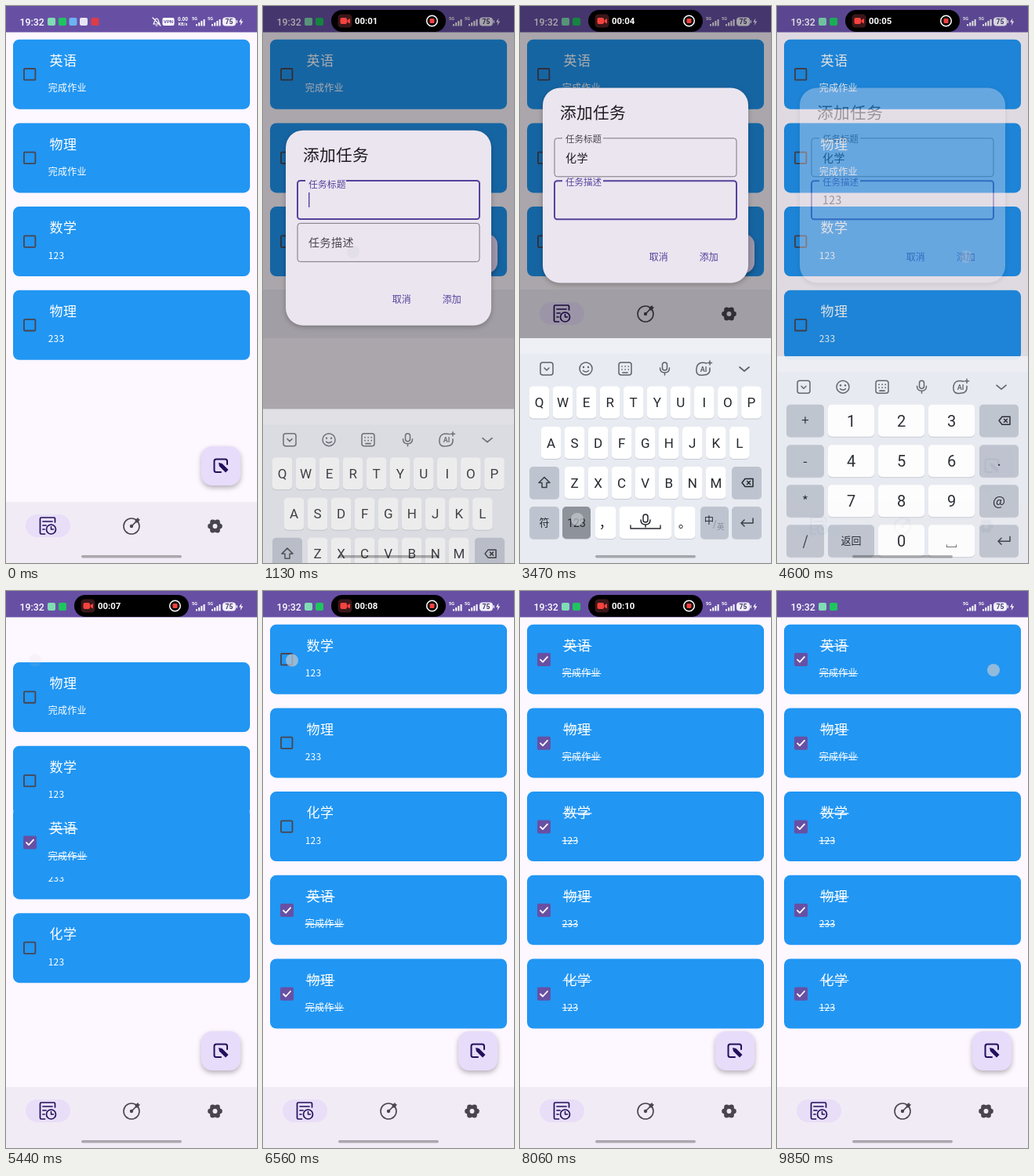
Animation of 320x711 px, one loop 9.95 s. Source, as an HTML page:

```html
<!DOCTYPE html>
<html lang="zh">
<head>
<meta charset="utf-8">
<title>Tasks</title>
<style>
html, body { margin: 0; width: 100%; height: 100%; overflow: hidden; background: #fdf7ff; }
svg { display: block; width: 100vw; height: 100vh; }
text { font-family: "Noto Sans CJK SC", "Noto Sans CJK", "Noto Sans", sans-serif; white-space: pre; }
.ui { font-family: Roboto, "Noto Sans CJK SC", sans-serif; }
#fab { filter: drop-shadow(0 3px 3px rgba(0, 0, 0, .28)); }
</style>
</head>
<body>
<svg id="stage" viewBox="0 0 320 711" xmlns="http://www.w3.org/2000/svg"></svg>
<script>
const LOOP = 9950, STEP = 93.81, TICK = 1.25;
const PURPLE = '#6750a4', ACCENT = '#54429b', INK = '#49454f', DEEP = '#21105a';

// Markup helpers; text is placed by its vertical centre.
const rect = (x, y, w, h, r, fill, more = '') =>
  `<rect x="${x}" y="${y}" width="${w}" height="${h}" rx="${r}" fill="${fill}" ${more}/>`;
const text = (x, y, size, str, fill, more = '') =>
  `<text x="${x}" y="${y + size * .37}" font-size="${size}" fill="${fill}" ${more}>${str}</text>`;
const line = (d, color, w = 1.5, more = '') =>
  `<path d="${d}" fill="none" stroke="${color}" stroke-width="${w}" stroke-linecap="round" stroke-linejoin="round" ${more}/>`;
const ring = (x, y, r, color, w = 1.5) =>
  `<circle cx="${x}" cy="${y}" r="${r}" fill="none" stroke="${color}" stroke-width="${w}"/>`;
const dot = (x, y, r, fill) => `<circle cx="${x}" cy="${y}" r="${r}" fill="${fill}"/>`;
const group = (id, body, more = '') => `<g id="${id}" ${more}>${body}</g>`;
const MID = 'text-anchor="middle"', UI = 'class="ui"';

// Tasks: each check sends the top card to the end of the list.
const tasks = [['英语', '完成作业'], ['物理', '完成作业'], ['数学', '123'], ['物理', '233'], ['化学', '123']];
const moves = [5335, 5990, 6640, 7109, 7720];
const MOVE = 200, PITCH = 106.7, TOP = 42.7;

const card = ([title, note], i) => group('card' + i,
  rect(9, 0, 302, 89, 8, '#2196f3') +
  rect(23, 37.3, 14.4, 14.4, 1, 'none', `stroke="${INK}" stroke-width="1.8" class="off"`) +
  text(55.5, 27, 17, title, '#fff', 'letter-spacing=".5"') +
  text(53.7, 62, 12, note, '#fff', 'letter-spacing=".25"') +
  `<g class="on">${rect(22, 36.3, 17, 17, 2, PURPLE)}${line('M26 45l3 3 6-6.5', '#fff', 1.8)}` +
  line(`M55 27.8h36M54 62.8h${note.length > 3 ? 49 : 19.5}`, '#fff', 1.1) + '</g>');

// Status bar
const signal = x => text(x - 8, 15.5, 5.5, '5G', '#fff', UI + ' font-weight="700"') +
  [0, 1, 2, 3].map(i => rect(x - 3 + i * 3.2, 23 - i * 2, 2, 2.5 + i * 2, .6, '#fff')).join('');
const badge = (x, c) => rect(x - 5, 15, 10, 10, 2, c);
const status = rect(0, 0, 320, 33.5, 0, PURPLE) +
  text(17.5, 20, 12.3, '19:32', '#fff', UI + ' font-weight="500"') +
  badge(58, '#7fdcb4') + badge(72, '#1fc45f') +
  group('extras',
    badge(85.5, '#6db2f2') + badge(99, '#e9e4f6') + badge(113.5, '#dd3c48') +
    line('M188 23h8c-2-2-1-7-4-7s-2 5-4 7M191 25h2M187 15l10 10', '#fff', 1.2) +
    rect(199.5, 15, 15, 10, 2, '#fff') +
    text(207, 20.2, 6, 'VPN', PURPLE, `${UI} ${MID} font-weight="700"`) +
    text(225.5, 17, 6.5, '0.00', '#fff', `${UI} ${MID} font-weight="700"`) +
    text(225.5, 23.2, 5.5, 'KB/s', '#fff', `${UI} ${MID} font-weight="700"`)) +
  signal(245) + signal(265) +
  rect(276, 14.5, 17, 11, 4, '#f4f0fb') + rect(293.5, 18, 1.5, 4, .7, '#f4f0fb') +
  text(284.5, 20.2, 8.5, '75', '#41376a', `${UI} ${MID} font-weight="700"`) +
  '<path d="M300.5 15.5l-3.5 5h2.5l-.8 4.500 3.500-5.500h-2.500z" fill="#fff"/>';

const island = group('island',
  rect(87, 5, 146, 28, 14, '#000') + rect(95.5, 10.5, 18, 17, 4.5, '#3b1719') +
  rect(98.500, 15, 8.500, 8, 2, '#f4433f') + '<path d="M107.500 18l3.500-2v6.500l-3.500-2z" fill="#f4433f"/>' +
  `<text id="clock" class="ui" x="117" y="23.200" font-size="11.400" font-weight="700" fill="#fff"></text>` +
  ring(215.5, 19, 6.8, '#fff', 1.5) + rect(212.500, 16, 6, 6, 1.200, '#f4433f'));

// Bottom navigation and floating button
const petals = [0, 1, 2, 3, 4, 5].map(i => {
  const a = i * Math.PI / 3;
  return dot(266.5 + 6 * Math.cos(a), 664 + 6 * Math.sin(a), 3.3, INK);
}).join('');
const nav = group('nav',
  rect(0, 633, 320, 360, 0, '#fdf7ff') + rect(0, 633, 320, 78, 0, '#f1ebf5', 'id="navBar"') +
  group('navIcons',
    rect(25, 649, 57, 29, 14.5, '#e8def8') +
    line('M62.500 659v-4.500q0-1.500-1.500-1.500h-16q-1.500 0-1.500 1.500v18q0 1.500 1.500 1.500h4.500M47 658h12M47 663h4M47 668h2', DEEP, 1.7) +
    ring(57.5, 668, 6, DEEP, 1.7) + line('M57.500 664.500v3.500h3', DEEP, 1.5) +
    ring(160, 664, 10, INK, 1.6) + dot(160, 664, 2.2, INK) +
    line('M160 664l7-7', INK, 1.6) + `<path d="M164.500 656l4-3 .5 2 2 .5-3 4h-3z" fill="${INK}"/>` +
    petals + ring(266.5, 664, 5.2, INK, 4.6) + dot(266.5, 664, 2.9, '#f1ebf5')));
const fab = group('fab',
  rect(249, 562, 50, 50, 14, '#e8dcfb') +
  line('M282 585v-4q0-2.500-2.500-2.500h-11.500q-2.500 0-2.500 2.500v11.500q0 2.500 2.500 2.500h6', DEEP, 2) +
  `<path d="M271 583l4.500 1 8 8-3.500 3.500-8-8z" fill="${DEEP}"/>`);

// Dialog
const field = (id, y, name) =>
  rect(44, y, 232, 49, 3.5, 'none', `id="${id}Box"`) +
  rect(54, y - 3, 52, 6, 0, '#ebe5f0', `id="${id}Gap"`) +
  `<text id="${id}Label" x="58">${name}</text>` +
  `<text id="${id}Value" x="58" y="${y + 30.2}" font-size="14" letter-spacing=".5" fill="#1d1b20"></text>` +
  rect(58, y + 15, 1.4, 19, 0, ACCENT, `id="${id}Caret"`);
const dialog = group('dialog',
  rect(29, 0, 262, 249, 22, '#ebe5f0', 'style="filter:drop-shadow(0 2px 3px rgba(0,0,0,.25))"') +
  text(51, 31.5, 20.7, '添加任务', '#1d1b20', 'letter-spacing=".3"') +
  field('title', 64.3, '任务标题') + field('note', 118.7, '任务描述') +
  text(164.7, 216, 12, '取消', ACCENT, 'font-weight="500"') +
  text(228.7, 216, 12, '添加', ACCENT, 'font-weight="500"'));

// Keyboard
const keyAt = {};
const GREY = '#bec4cf', rowY = [485.5, 537, 588, 639];
const key = (name, x, row, w, fill = '#fff', size = 17) => {
  const y = rowY[row];
  keyAt[name] = [x + w / 2, y + 20];
  return rect(x, y + 1, w, 41, 5, '#c6cad3') + rect(x, y, w, 41, 5, fill, `data-key="${name}"`) +
    (size ? text(x + w / 2, y + 20.5, size, name, '#24272d', `${/\w/.test(name) ? UI : ''} ${MID}`) : '');
};
const letters = (str, x, row) => [...str].map((c, i) => key(c, x + i * 30.05, row, 25.6)).join('');
const erase = y => line(`M283 ${y}l4-5h10v10h-10zM289.500 ${y - 2}l4 4m0-4l-4 4`, '#24272d', 1.5);
const enter = line('M297 654v6h-15m4-4l-4 4 4 4', '#3a3e46', 1.5);
const mic = (x, y, c) => rect(x - 3, y - 8, 6, 10, 3, 'none', `stroke="${c}" stroke-width="1.500"`) +
  line(`M${x - 6} ${y - 1}q0 6 6 6t6-6M${x} ${y + 5}v3`, c);
const TOOL = '#5d626b';
const tools = group('tools',
  rect(26, 455, 16, 16, 3, 'none', `stroke="${TOOL}" stroke-width="1.500"`) + line('M31 462l3 3 3-3', TOOL) +
  ring(84, 463, 8, TOOL) + dot(81, 461, 1.2, TOOL) + dot(87, 461, 1.2, TOOL) + line('M80.500 465.500q3.500 3 7 0', TOOL) +
  rect(126, 455, 16, 16, 3, 'none', `stroke="${TOOL}" stroke-width="1.500"`) +
  line('M130 460h.1m4 0h.1m4 0h.1M130 464h.1m4 0h.1m4 0h.1M131 468h6', TOOL, 1.7) +
  mic(184.5, 463, TOOL) +
  line('M238 456q-12-3-13 7t9 8q9 0 8-9M242 453v5m-2.500-2.500h5', TOOL) +
  text(234, 463.5, 9, 'AI', TOOL, `${UI} ${MID} font-weight="700"`) +
  line('M280 461l6 5 6-5', TOOL, 1.7));
const alpha = group('alpha',
  letters('QWERTYUIOP', 11.7, 0) + letters('ASDFGHJKL', 26.7, 1) + letters('ZXCVBNM', 56.7, 2) +
  key('shift', 12, 2, 38, GREY, 0) + line('M31 601.500l-7 7h4v6h6v-6h4z', '#3a3e46') +
  key('del', 270, 2, 38, GREY, 0) + erase(608.5) +
  key('符', 12, 3, 38, GREY, 13) + key('123', 54, 3, 36, GREY, 14) +
  key('，', 96, 3, 26.5) + key('space', 126.5, 3, 67, '#fff', 0) + mic(160, 657, '#24272d') +
  line('M141 663v4h38v-4', '#24272d', 1.4) + key('。', 197, 3, 26.5) +
  key('lang', 230, 3, 36, GREY, 0) + text(235, 657, 12, '中', '#24272d') +
  text(246, 661, 11, '/', '#858b96') + text(251, 664, 9.5, '英', '#858b96') +
  key('enter', 270, 3, 38, GREY, 0) + enter);
const digits = group('digits',
  [...'+-*/'].map((c, i) => key(c, 12, i, 48, GREY)).join('') +
  [...'123456789'].map((c, i) => key(c, 65 + i % 3 * 64, i / 3 | 0, 59, '#fff', 20)).join('') +
  key('返回', 65, 3, 59, GREY, 13) + key('0', 129, 3, 59, '#fff', 20) + key('␣', 193, 3, 59) +
  key('bksp', 258, 0, 50, GREY, 0) + erase(506) +
  key('.', 258, 1, 50, GREY) + key('@', 258, 2, 50, GREY) + key('ret', 258, 3, 50, GREY, 0) + enter);
// The digit pad has its own "123" neighbours, so the mode key keeps its place.
const keyboard = group('keyboard',
  rect(0, 424, 320, 290, 0, '#e8ebf1') + rect(0, 424, 320, 20, 0, '#eef0f5') + tools +
  group('strip', `<text id="pinyin" class="ui" x="14" y="438" font-size="11" fill="${TOOL}"></text>` +
    `<text id="words" x="16" y="469" font-size="16" fill="#24272d"></text>`) + alpha + digits);

document.getElementById('stage').innerHTML =
  rect(0, 0, 320, 711, 0, '#fdf7ff') + group('list', tasks.map(card).join('')) +
  nav + fab + status + rect(0, 0, 320, 711, 0, '#000', 'id="scrim"') +
  dialog + keyboard + rect(96, 701, 128, 3.6, 1.8, '#000', 'id="handle" opacity=".29"') +
  island + '<g id="touches"></g>';

const $ = id => document.getElementById(id);
const set = (id, attrs) => { for (const k in attrs) $(id).setAttribute(k, attrs[k]); };
const show = (node, on) => { node.style.display = on ? '' : 'none'; };
const prog = (t, start, dur) => Math.min(1, Math.max(0, (t - start) / dur));
const out = p => 1 - (1 - p) * (1 - p);
const inOut = p => .5 - Math.cos(p * Math.PI) / 2;

// Touches: down, up, x, y, key
const press = (t, k) => [t, t + 90, ...keyAt[k], k];
const TYPE = 1450, GAP = 180, PICK = 2680;
const touches = [
  [420, 500, 274, 588], [900, 1010, 115, 314],
  ...[...'HUAXUE'].map((c, i) => press(TYPE + i * GAP, c)),
  [2600, PICK, 31, 463], [2900, 2990, 110, 247], [3420, 3520, 73, 655, '123'],
  ...[...'123'].map((c, i) => press(3740 + i * 190, c)),
  [4410, 4500, 241, 320],
  ...moves.map(m => [m - 130, m - 40, 37, 88.5]),
  [9700, LOOP + 90, 276, 101]
];
$('touches').innerHTML = touches.map(([, , x, y]) => dot(x, y, 8, '#c9ccd2')).join('');
const marks = [...$('touches').children];
const caps = [...document.querySelectorAll('[data-key]')].map(n => [n, n.dataset.key, n.getAttribute('fill')]);

function drawList(t) {
  tasks.forEach((_, i) => {
    const node = $('card' + i);
    let slot = i;
    moves.forEach((m, k) => {
      const p = inOut(prog(t, m, MOVE));
      slot += i === k ? 4 * p : -p;
    });
    node.setAttribute('transform', `translate(0 ${TOP + slot * PITCH})`);
    const done = t >= moves[i] - 40;
    show(node.querySelector('.on'), done);
    show(node.querySelector('.off'), !done);
    show(node, i < 4 || t > 4600);
    node.setAttribute('opacity', i < 4 ? 1 : prog(t, 4600, 150));
  });
  // The travelling card stays above the others.
  const k = moves.findIndex(m => t < m + MOVE);
  if (k >= 0) $('list').append($('card' + k));
}

function drawField(id, y, t, from, until, value) {
  const p = out(prog(t, from, 200)), focus = t >= from && t < until;
  const size = 14 - 2.5 * p, mid = y + 24.5 - 23.3 * p;
  set(id + 'Box', { stroke: focus ? ACCENT : '#7a757f', 'stroke-width': focus ? 2 : 1 });
  show($(id + 'Gap'), p > .5);
  set(id + 'Label', { y: mid + size * .37, 'font-size': size, 'letter-spacing': .5 - .5 * p, fill: focus ? ACCENT : INK });
  $(id + 'Value').textContent = value;
  set(id + 'Caret', { x: 58 + value.length * (id === 'title' ? 14.5 : 8.3) });
  show($(id + 'Caret'), focus && (t - from) % 800 < 400);
}

function draw(t) {
  drawList(t);
  show($('extras'), t < 90);

  const pop = Math.min(out(prog(t, 60, 200)), 1 - prog(t, 9550, 160));
  set('island', { transform: `translate(160 19) scale(${pop}) translate(-160 -19)` });
  $('clock').textContent = '00:' + String(Math.floor(t * TICK / 1000 + .25)).padStart(2, '0');

  const raised = t >= 1050 && t < 4580;
  const lift = `translate(0 ${raised ? -271 : 0})`;
  set('nav', { transform: lift });
  set('fab', { transform: lift });
  set('navBar', { height: raised ? 62 : 78 });
  show($('navIcons'), !raised || t > 1250);

  const open = Math.min(prog(t, 520, 130), 1 - prog(t, 4520, 120));
  set('scrim', { opacity: .33 * open });
  set('dialog', { opacity: open, transform: `translate(0 ${104.500 + 134.500 * (1 - out(prog(t, 1000, 344)))})` });
  drawField('title', 64.3, t, 1000, 3000, t >= PICK ? '化学' : '');
  const typed = Math.min(3, Math.max(0, Math.floor((t - 3780) / 190) + 1));
  drawField('note', 118.7, t, 3000, 5000, '123'.slice(0, typed));

  const up = out(prog(t, 1000, 287)) * (1 - inOut(prog(t, 4560, 200)));
  show($('keyboard'), up > 0);
  set('keyboard', { opacity: .35 + .65 * up, transform: `translate(0 ${287 * (1 - up)})` });
  const pad = t >= 3560, spelling = t >= TYPE + 50 && t < PICK;
  show($('alpha'), !pad);
  show($('digits'), pad);
  show($('tools'), !spelling);
  show($('strip'), spelling);
  const count = Math.floor((t - TYPE - 50) / GAP) + 1;
  $('pinyin').textContent = 'huaxue'.slice(0, Math.max(0, count)).replace('x', "'x");
  $('words').textContent = count < 4 ? '话   花   画   化   华' : '化学   滑雪   花   话   画';

  const held = touches.filter(([a, b]) => t >= a && t < b).map(h => h[4]);
  for (const [node, name, fill] of caps)
    node.setAttribute('fill', held.includes(name) ? (name === '123' ? '#8d929b' : '#cdd1d9') : fill);
  touches.forEach(([a, b], i) => marks[i].setAttribute('opacity', t < a ? 0 : .68 * (1 - prog(t, b - 20, 200))));
}

const start = performance.now();
function frame() {
  const t = (performance.now() - start) % LOOP;
  draw(Math.floor((t + 8) / STEP) * STEP);
  requestAnimationFrame(frame);
}
frame();
</script>
</body>
</html>
```
